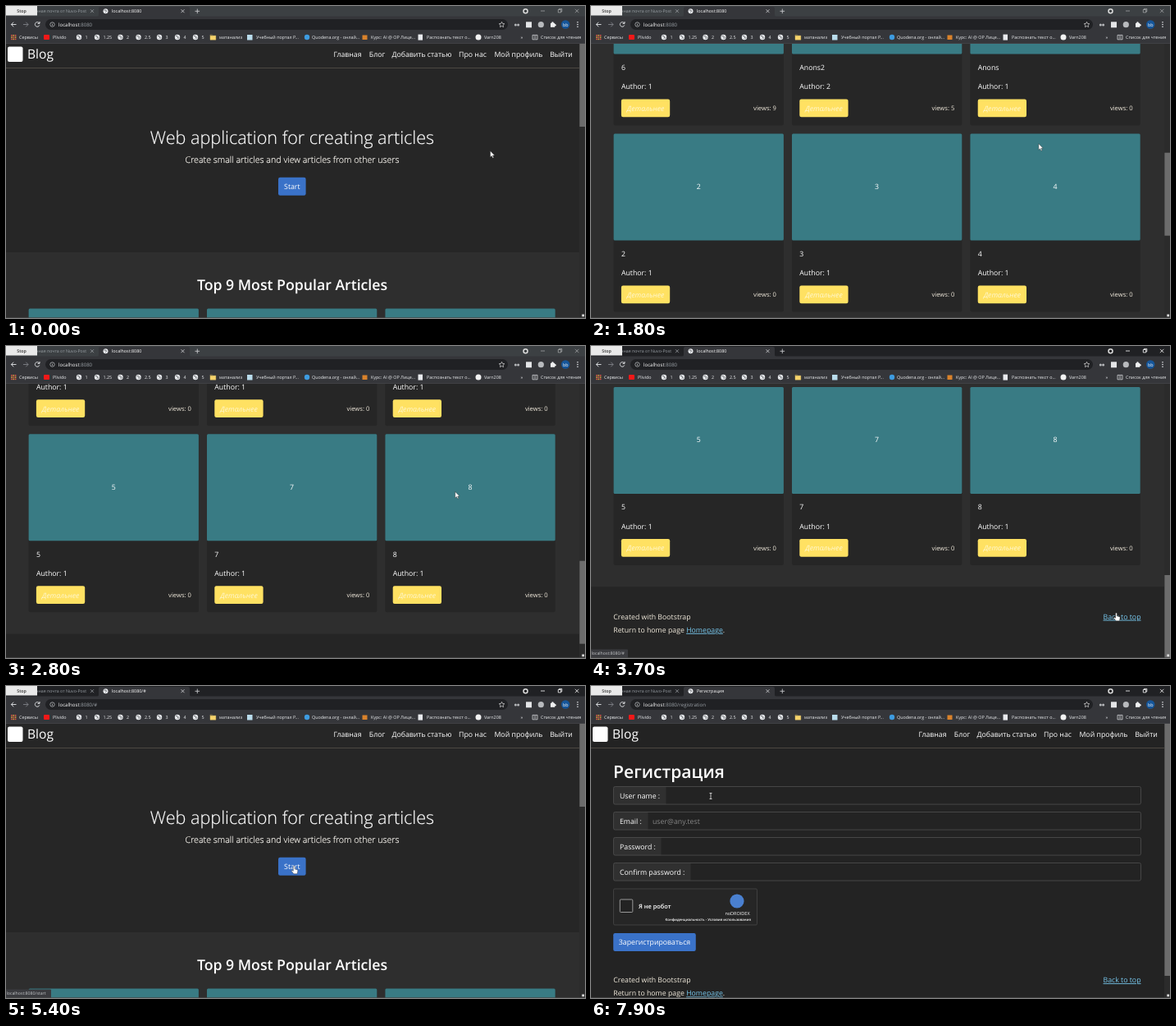
Recreate the animation shown at these times as an HTML page. Size 706 by 380 pixels, loop 8 s.

```html
<!DOCTYPE html>
<html lang="ru">
<head>
<meta charset="utf-8">
<title>Blog</title>
<style>
  html, body { margin: 0; width: 100%; height: 100%; overflow: hidden; background: #232323; }
  svg { display: block; width: 706px; height: 380px; }
  text { font-family: "Open Sans", "Noto Sans", sans-serif; font-size: 8.75px; fill: #fff; text-rendering: geometricPrecision; }
  .light { font-weight: 300; stroke: #fff; stroke-width: 0.2px; }
  .link { fill: #78c8ee; text-decoration: underline; }
</style>
</head>
<body>
<svg id="stage" viewBox="0 0 706 380"></svg>
<script>
const LOOP = 8000;
const MAX_SCROLL = 772.5;

// Markup helpers
const rect = (x, y, w, h, fill, extra = '') =>
  `<rect x="${x}" y="${y}" width="${w}" height="${h}" fill="${fill}" ${extra}/>`;
const disc = (x, y, r, fill, extra = '') =>
  `<circle cx="${x}" cy="${y}" r="${r}" fill="${fill}" ${extra}/>`;
const line = (d, color = '#e8eaed', width = 0.9) =>
  `<path d="${d}" fill="none" stroke="${color}" stroke-width="${width}"/>`;
const text = (x, y, s, style = '', anchor = 'start', extra = '') =>
  `<text x="${x}" y="${y}" text-anchor="${anchor}" style="${style}" ${extra}>${s}</text>`;
const size = (px, more = '') => `font-size:${px}px;${more}`;
const link = s => `<tspan class="link">${s}</tspan>`;
const group = (id, content) => `<g id="${id}">${content}</g>`;

function navbar(shift) {
  const items = [[416.5, 'Главная'], [452.5, 'Блог'], [507, 'Добавить статью'],
    [569, 'Про нас'], [625, 'Мой профиль'], [677, 'Выйти']];
  return rect(2, 49.5, 18.5, 18.5, '#fff', 'rx="2"') +
    text(26, 64.2, 'Blog', size(15.6)) +
    items.map(([x, s]) => text(x + shift, 62.3, s, '', 'middle')).join('') +
    rect(0, 75, 706, 0.8, '#555049');
}

function footer(x, right, y) {
  const cream = 'fill:#f1eadc';
  return text(x, y, 'Created with Bootstrap', cream) +
    text(x, y + 16.2, `Return to home page ${link('Homepage')}.`, cream) +
    text(right, y, link('Back to top'), '', 'end');
}

function card(x, y, title, anons, author, views) {
  return rect(x, y, 207.3, 217, '#262626', 'rx="2"') +
    rect(x, y, 207.3, 130, '#397b84', 'rx="1.5"') +
    text(x + 103.6, y + 67.3, title, '', 'middle') +
    text(x + 9.3, y + 149.4, anons) +
    text(x + 9.3, y + 172.8, 'Author: ' + author) +
    rect(x + 9.3, y + 185, 59.3, 21.7, '#ffe162', 'rx="2.2"') +
    text(x + 39, y + 199.2, 'Детальнее', 'font-style:italic;fill:#fff7d0', 'middle') +
    text(x + 198.3, y + 198.8, 'views: ' + views, size(7.63, 'fill:#f1eadc'), 'end');
}

function home() {
  const cards = [['6', '6', 1, 9], ['Nam2', 'Anons2', 2, 5], ['Name', 'Anons', 1, 0],
    ...[2, 3, 4, 5, 7, 8].map(n => [n, n, 1, 0])];
  return rect(0, 46, 706, 254, '#262626') +
    rect(0, 300, 706, 766, '#2e2e2e') +
    rect(0, 1066, 706, 90, '#252525') +
    navbar(0) +
    text(349, 168, 'Web application for creating articles', size(21.6), 'middle', 'class="light"') +
    text(349, 190.6, 'Create small articles and view articles from other users',
      size(10.68, 'fill:#f3ecde'), 'middle', 'class="light"') +
    rect(332, 208.7, 33.6, 22, '#3a72c8', 'rx="2.2"') +
    text(348.8, 223.2, 'Start', '', 'middle') +
    text(349, 345.6, 'Top 9 Most Popular Articles', size(17.7, 'font-weight:600'), 'middle') +
    cards.map((c, i) => card(27.6 + (i % 3) * 217.4, 368.5 + Math.floor(i / 3) * 227, ...c)).join('') +
    footer(27.3, 670.5, 1105.2);
}

function start() {
  const lines = [
    'Добро пожаловать на сайт',
    `После прохождении ${link('регистрации')} вам будет открыт доступ к всем функциям сайта`,
    `Вы можете начать ${link('создавать')} статьи`,
    'Так же вы можете просматривать статьи других пользователей',
    'И ставить им оценки, а также подписываться на авторов',
    `Ваши подписки и подписчики, а так же статьи будут доступны в ${link('профиле')}`];
  return rect(0, 46, 706, 334, '#232323') + navbar(8) +
    lines.map((s, i) => text(31, 100.3 + i * 23.1, s)).join('') +
    footer(31, 674, 266.6);
}

function registration() {
  const fields = [['User name :', 64], ['Email :', 42], ['Password :', 58], ['Confirm password :', 94]];
  return rect(0, 46, 706, 334, '#232323') + navbar(0) +
    text(27, 112.3, 'Регистрация', size(21.1, 'font-weight:600')) +
    fields.map(([s, w], i) => {
      const y = 122.5 + i * 31;
      return rect(27.5, y, w, 21.6, '#303030') +
        rect(27.5, y, 643, 21.6, 'none', 'rx="2" stroke="#505050" stroke-width=".8"') +
        text(35, y + 14.2, s);
    }).join('') +
    text(75, 167.7, 'user@any.test', 'fill:#858585') +
    rect(27.5, 247, 175, 44, '#262626', 'rx="1.5" stroke="#484848" stroke-width=".8"') +
    rect(35.3, 260, 15.5, 15.5, '#232323', 'rx="1" stroke="#999" stroke-width="1"') +
    text(58, 271, 'Я не робот', size(7.4, 'font-weight:600')) +
    disc(178, 262, 8.6, '#4a80d0') +
    text(178.5, 279, 'noDROIDEX', size(5.5), 'middle') +
    text(195, 285.7, 'Конфиденциальность - Условия использования', size(4.3, 'font-weight:600'), 'end') +
    rect(27.2, 301, 100.6, 22, '#3a72c8', 'rx="2.2"') +
    text(77.5, 315.3, 'Зарегистрироваться', '', 'middle') +
    footer(27.3, 670.5, 361.2);
}

function bookmarks() {
  const small = size(5.4, 'fill:#eceef0');
  const globes = [[89, '1'], [111, '1.25'], [139.5, '2'], [161.5, '2.5'], [187, '3'], [209, '4'], [231, '5']];
  const labels = [[16, 'Сервисы'], [57, 'Plivido'], [260, 'матанализ'], [305, 'Учебный портал P...'],
    [373, 'Quodena.org - онлай...'], [445, 'Курс: AI @ ОР Лице...'], [513, 'Распознать текст о...'],
    [583, 'Varn208'], [627.5, '»'], [652, 'Список для чтения']];
  let apps = '';
  for (let i = 0; i < 9; i++)
    apps += rect(6.2 + (i % 3) * 2.3, 35 + Math.floor(i / 3) * 2.3, 1.6, 1.6, i % 2 ? '#d9a13c' : '#e0574b');
  return apps +
    globes.map(([x, s]) => disc(x, 38, 3.2, '#e8eaed') +
      line(`M${x - 2} 36.6h2l1 1.3-1.4 1.3M${x + 1} 39.8l1-1.4`, '#4a4c50', 0.8) +
      text(x + 7.5, 40, s, small)).join('') +
    labels.map(([x, s]) => text(x, 40, s, small)).join('') +
    rect(46, 35, 7, 6, '#f01818', 'rx="1"') +
    line('M249 35.2h2.6l1 1h3.2v5h-6.8z', '#f6d36b', 0.4) + rect(249, 36.2, 6.8, 5, '#f6d36b') +
    rect(294, 35, 6.5, 6.5, '#b9dcec') + disc(367, 38, 3.2, '#3d9be0') +
    rect(434.5, 35.5, 6, 5.5, '#d9822b') + rect(502.5, 34.6, 5.5, 7, '#e8eaed') +
    disc(576, 38, 3.5, '#f2f2f2') +
    line('M642 35.4h6v5.4h-6zM643.5 37h3M643.5 39h3', '#e8eaed', 0.7);
}

function browser() {
  return rect(0, 0, 706, 13, '#202124', 'id="strip"') +
    `<path d="M111 13q2 0 2-3V3q0-2 2-2h107q2 0 2 2v7q0 3 2 3z" fill="#35363a"/>` +
    rect(0, 12.5, 706, 33.5, '#35363a') + rect(0, 45.4, 706, 0.6, '#48494d') +
    text(98, 8.2, 'нная почта от Nuvo-Post', size(5.2, 'fill:#9aa0a6'), 'end') +
    line('M103 4.2l4 4m0-4l-4 4', '#a5a9ae', 0.7) +
    disc(121.5, 6.2, 3, '#e8eaed') + line('M119.6 5h2l1 1.3-1.4 1.3', '#4a4c50', 0.8) +
    text(129, 8.2, '', size(5.4), 'start', 'id="tab"') +
    line('M213.5 4.2l4 4m0-4l-4 4', '#e8eaed', 0.7) +
    line('M230.5 6.3h5.6m-2.8-2.8v5.6', '#d5d7da', 0.8) +
    disc(633.5, 6.2, 2.5, 'none', 'stroke="#ddd" stroke-width="1.5"') +
    group('controls', line('M652 6h5M673.3 4.5h3.4v3.4h-3.4zM674.4 4.4v-1h3.4v3.4h-1M694 3.8l4.4 4.4m0-4.4l-4.4 4.4', '#fff', 0.8)) +
    rect(48, 16, 564, 13, '#202124', 'rx="6.5"') +
    line('M12.5 22.5h-6m2.7-2.8l-2.8 2.8 2.8 2.8') +
    line('M21 22.5h6m-2.7-2.8l2.8 2.8-2.8 2.8', '#808388') +
    line('M40.6 21a2.8 2.8 0 1 0 .2 2.4M41 19v2.4h-2.4') +
    disc(56.5, 22.5, 2.7, 'none', 'stroke="#c8cacd" stroke-width=".7"') +
    line('M56.5 22v2M56.5 20.8v.6', '#c8cacd', 0.7) +
    `<text x="64" y="24.8" style="font-size:6.1px">localhost<tspan id="path" fill="#9aa0a6"></tspan></text>` +
    line('M604.5 19.3l1 2.1 2.3.3-1.7 1.6.4 2.3-2-1.1-2 1.1.4-2.3-1.7-1.6 2.3-.3z', '#ddd', 0.7) +
    disc(621.3, 23, 1.5, '#b5b7ba') + disc(624.6, 23, 1.5, '#b5b7ba') +
    rect(634, 19.3, 7, 7, '#e4e5e7') + disc(652.3, 22.7, 3.6, '#b8babd') +
    rect(664, 20.8, 5.2, 5, '#f0f1f2') + disc(666.5, 20.4, 1.2, '#f0f1f2') + disc(669.5, 23.2, 1.2, '#f0f1f2') +
    disc(682.2, 22.5, 5.2, '#15569a') + text(682.2, 24.6, 'bb', size(5.4), 'middle') +
    [19.8, 22.5, 25.2].map(y => disc(697, y, 0.8, '#e8eaed')).join('') +
    bookmarks() +
    rect(0, 0, 38, 11.5, '#e9e9e9') +
    text(19, 7.6, 'Stop', size(5.3, 'fill:#333;font-weight:600'), 'middle');
}

const cursors =
  `<path id="arrow" d="M0 0v7.6l1.8-1.6 1.2 2.7 1.2-.6-1.2-2.6h2.4z" fill="#fff" stroke="#222" stroke-width=".4"/>` +
  `<path id="hand" d="M-.9.8q.9-1.5 1.8 0v3.1l3 .8q.9.4.7 1.5l-.7 3.6h-4.2L-3 6.4q-.2-1.3 1-.9l1.1.9z" fill="#fff" stroke="#222" stroke-width=".4"/>` +
  `<path id="beam" d="M-1.5-3.5h3M0-3.5v7M-1.5 3.5h3" fill="none" stroke="#eee" stroke-width=".8"/>`;

document.getElementById('stage').innerHTML =
  group('home', home()) + group('start', start()) + group('registration', registration()) +
  group('scrollbar', rect(699, 46, 7, 334, '#2b2b2b') + rect(699.4, 46, 6.6, 101, '#6c6c6c', 'id="thumb"')) +
  browser() +
  group('status', rect(-1, 369.5, 0, 12, '#3a3b3f', 'id="statusBox" rx="1"') +
    text(0.5, 376.4, '', size(5.2, 'fill:#c4c6c9'), 'start', 'id="statusText"')) +
  rect(0, 379.3, 706, 0.7, '#484848') + rect(702.3, 375.5, 2.8, 2.8, '#ddd') +
  group('cursor', cursors);

const el = id => document.getElementById(id);
const show = (id, on) => el(id).setAttribute('display', on ? 'inline' : 'none');

// Rows are [time, values...], joined by straight lines
function track(keys, t) {
  const i = keys.findIndex(k => k[0] > t);
  if (i < 0) return keys[keys.length - 1].slice(1);
  const a = keys[i - 1], b = keys[i], p = (t - a[0]) / (b[0] - a[0]);
  return a.slice(1).map((v, n) => v + (b[n + 1] - v) * p);
}
const easeInOut = p => p < 0.5 ? 4 * p ** 3 : 1 - 4 * (1 - p) ** 3;

const wheel = [[0, 0], [100, 8], [1000, 282.5], [1300, 332], [1800, 440], [2400, 600.5], [3000, MAX_SCROLL]];
const pointer = [[0, 590.5, 176.5], [1000, 545, 158], [2400, 546.5, 175], [2900, 548, 178], [3500, 640.5, 325],
  [3800, 640.5, 325], [4300, 599.5, 301], [5200, 352, 219], [5700, 350, 219], [6400, 148.5, 123],
  [7300, 148.5, 123], [7800, 146, 134]];

function scrollAt(t) {
  if (t < 3700) return track(wheel, t)[0];
  return MAX_SCROLL * (1 - easeInOut(Math.min(1, (t - 3700) / 766)));
}

function statusAt(t) {
  if (t >= 3500 && t < 4600) return ['localhost:8080/#', 45];
  if (t >= 5200 && t < 5700) return ['localhost:8080/start', 55];
  if (t >= 6300 && t < 7400) return ['localhost:8080/registration', 69];
  return null;
}

function draw(t) {
  const page = t < 5600 ? 'home' : t < 7400 ? 'start' : 'registration';
  for (const id of ['home', 'start', 'registration']) show(id, id === page);

  const scroll = scrollAt(t);
  el('home').setAttribute('transform', `translate(0 ${-scroll})`);
  show('scrollbar', page !== 'start');
  el('thumb').setAttribute('y', page === 'home' ? 46 + scroll * 233 / MAX_SCROLL : 46);
  el('thumb').setAttribute('height', page === 'home' ? 101 : 307);

  const path = page !== 'home' ? '/' + page : t > 3700 ? '/#' : '';
  el('path').textContent = ':8080' + path;
  el('tab').textContent = page === 'registration' ? 'Регистрация' : 'localhost:8080' + path;

  const focused = t >= 3500;
  el('strip').setAttribute('fill', focused ? '#202124' : '#3c4043');
  el('controls').setAttribute('opacity', focused ? 1 : 0.5);

  const status = statusAt(t);
  show('status', status);
  if (status) {
    el('statusText').textContent = status[0];
    el('statusBox').setAttribute('width', status[1] + 1);
  }

  const shape = t >= 7600 ? 'beam' :
    (t >= 3500 && t < 3900) || (t >= 5200 && t < 5700) || (t >= 6300 && t < 7400) ? 'hand' : 'arrow';
  for (const id of ['arrow', 'hand', 'beam']) show(id, id === shape);
  el('cursor').setAttribute('transform', `translate(${track(pointer, t)})`);
}

const begin = performance.now();
function tick() {
  const t = (performance.now() - begin) % LOOP;
  draw(Math.floor(t / 100) * 100);
  requestAnimationFrame(tick);
}
tick();
</script>
</body>
</html>
```
